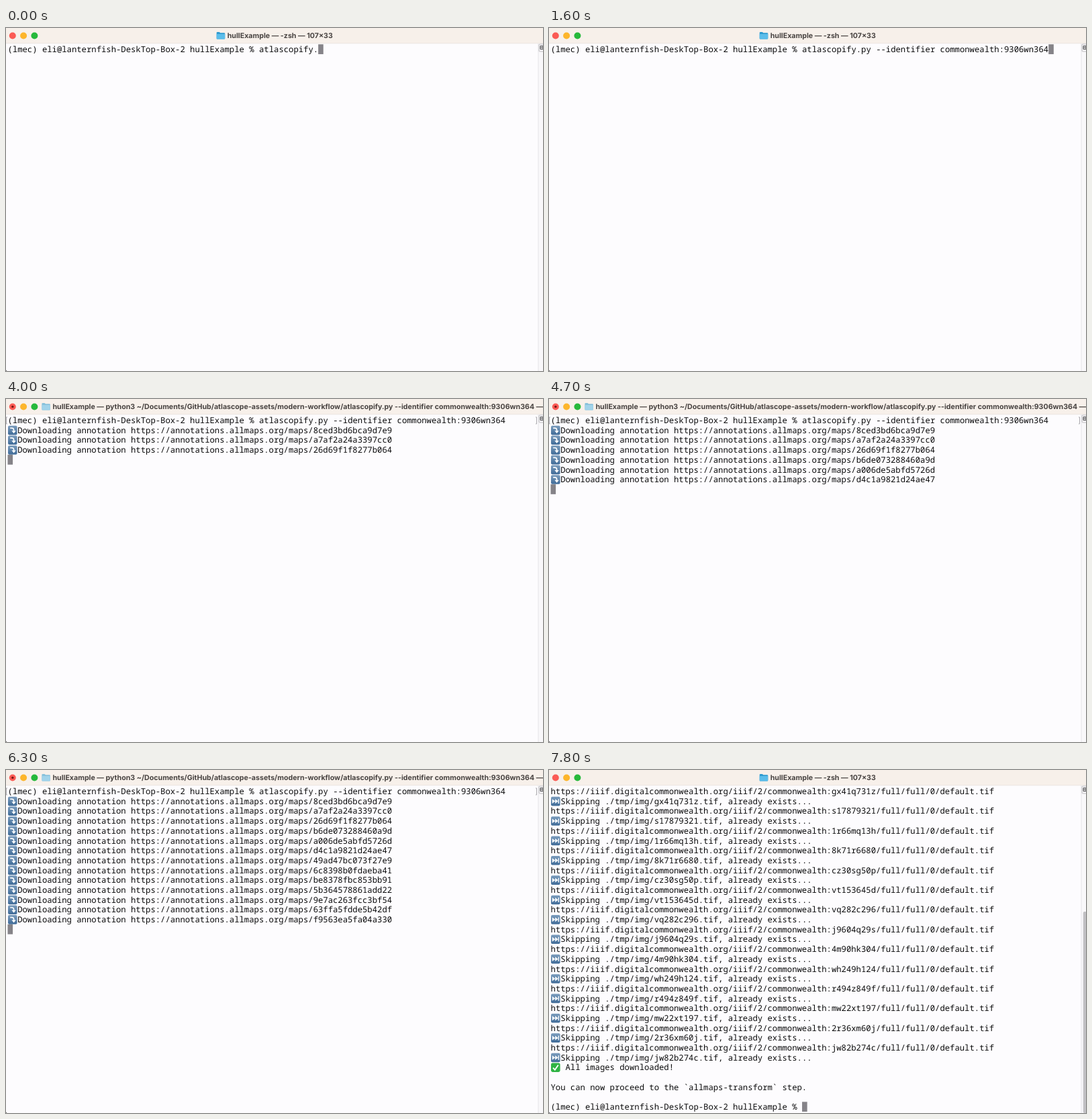
Write an HTML page that moves like this. It is 800 by 511 pixels and loops after 7.9 s.

```html
<!DOCTYPE html>
<html lang="en">
<head>
<meta charset="utf-8">
<title>Terminal session</title>
<style>
  html, body { margin: 0; width: 100%; height: 100%; overflow: hidden; background: #fdfcfe; }
  svg { display: block; width: 800px; height: 511px; }
  text { white-space: pre; text-rendering: geometricPrecision; }
  .mono { font: 500 12.24px "Noto Sans Mono", "DejaVu Sans Mono", monospace; fill: #0b0b0c; }
  .title { font: 700 10.65px Inter, Roboto, sans-serif; fill: #484341; }
  .cursor { fill: #858388; }
</style>
</head>
<body>
<svg id="stage" viewBox="0 0 800 511">
  <defs>
    <linearGradient id="key" x1="0" y1="0" x2="0" y2="1">
      <stop offset="0" stop-color="#7c9dbd"/>
      <stop offset="1" stop-color="#3f6b98"/>
    </linearGradient>
    <g id="down">
      <rect width="13.6" height="13.6" rx="2" fill="url(#key)"/>
      <path d="M3.2 3.6H6Q8.6 3.6 8.6 6.4V8" fill="none" stroke="#fff" stroke-width="1.7"/>
      <path d="M5.4 7.4H11.8L8.6 11.4Z" fill="#fff"/>
    </g>
    <g id="skip">
      <rect width="13.6" height="13.6" rx="2" fill="url(#key)"/>
      <path d="M1.8 3.4L6.2 6.8L1.8 10.2ZM6.2 3.4L10.6 6.8L6.2 10.2ZM10.6 3.4H12V10.2H10.6Z" fill="#fff"/>
    </g>
    <g id="check">
      <rect width="13.6" height="13.6" rx="2.4" fill="#2fb343"/>
      <path d="M3 7.2L5.8 10.4L10.8 3" fill="none" stroke="#fff" stroke-width="1.9"/>
    </g>
    <g id="folder">
      <path d="M0 1.4Q0 .3 1.1 .3H4.2L5.5 1.7H11.4Q12.5 1.7 12.5 2.8V10Q12.5 11 11.4 11H1.1Q0 11 0 10Z" fill="#2f9bd0"/>
      <path d="M0 3.4H12.5V10Q12.5 11 11.4 11H1.1Q0 11 0 10Z" fill="#5bbdea"/>
    </g>
  </defs>
  <rect width="800" height="511" fill="#fdfcfe"/>
  <rect width="800" height="23" fill="#f7f0ea"/>
  <rect y="22.5" width="800" height=".8" fill="#e9e3df"/>
  <rect x="793" y="23" width="7" height="488" fill="#f9f8fa"/>
  <rect x="792.5" y="23" width="1" height="488" fill="#e5e4e7"/>
  <rect x="794" y="24" width="8" height="11" rx="1" fill="#f1f0f2" stroke="#b5b4b7" stroke-width=".8"/>
  <path d="M796 26.8H800V31.5H796ZM796 29H800" fill="none" stroke="#4b4a4d"/>
  <path d="M0 509.2V511H1.8Q.4 510.6 0 509.2Z" fill="#333"/>
  <circle cx="9.8" cy="11.5" r="5" fill="#fb5b55"/>
  <circle cx="26.1" cy="11.5" r="5" fill="#fdb52b"/>
  <circle cx="42.4" cy="11.5" r="5" fill="#27b93c"/>
</svg>
<script>
const LOOP = 7900, RUN = 1900, DONE = 7600;
const LEFT = 2.5, CELL = 7.344, TOP = 24.3, ROW = 14.69;
const PROMPT = "(lmec) eli@lanternfish-DeskTop-Box-2 hullExample % ";
const COMMAND = "atlascopify.py --identifier commonwealth:9306wn364";
const PASTE = 28;
const MAPS = `8ced3bd6bca9d7e9 a7af2a24a3397cc0 26d69f1f8277b064 b6de073288460a9d
  a006de5abfd5726d d4c1a9821d24ae47 49ad47bc073f27e9 6c8398b0fdaeba41 be8378fbc853bb91
  5b364578861add22 9e7ac263fcc3bf54 63ffa5fdde5b42df f9563ea5fa04a330 7655d88667eb3dfb
  1abe32d90639821e 6f3c4418b8f74edd bce1adfccef4358b`.split(/\s+/);
const MAP_TIMES = [3600, 3800, 4000, 4300, 4500, 4700, 4900, 5100, 5300, 5500,
  5800, 6000, 6300, 6500, 6800, 7000, 7200];
const IMAGES = `gx41q731z s17879321 1r66mq13h 8k71r6680 cz30sg50p vt153645d vq282c296
  j9604q29s 4m90hk304 wh249h124 r494z849f mw22xt197 2r36xm60j jw82b274c`.split(/\s+/);

const stage = document.getElementById("stage");
const timed = [];
const colX = c => LEFT + c * CELL;
const rowY = r => TOP + r * ROW;

function add(tag, attrs, text = "", parent = stage) {
  const el = document.createElementNS("http://www.w3.org/2000/svg", tag);
  for (const name in attrs) el.setAttribute(name, attrs[name]);
  el.textContent = text;
  return parent.appendChild(el);
}

// A group that is visible from one time up to another.
function span(from, to) {
  const el = add("g", {});
  timed.push({ el, from, to });
  return el;
}

const write = (parent, row, col, text) =>
  add("text", { class: "mono", x: colX(col), y: rowY(row) + 11.8 }, text, parent);
const icon = (parent, row, name) =>
  add("use", { href: "#" + name, x: 3, y: rowY(row) + 0.8 }, "", parent);

function titleBar(parent, iconX, text, opacity) {
  add("use", { href: "#folder", x: iconX, y: 5.6, opacity }, "", parent);
  add("text", { class: "title", x: iconX + 16, y: 15 }, text, parent);
}

const shell = "hullExample — -zsh — 107×33";
titleBar(span(0, RUN), 313.7, shell, 1);
titleBar(span(DONE, LOOP), 313.7, shell, 1);

const running = span(RUN, DONE);
titleBar(running, 53.4, "hullExample — python3 ~/Documents/GitHub/atlascope-assets/modern-workflow/" +
  "atlascopify.py --identifier commonwealth:9306wn364 —...", 0.55);
add("circle", { cx: 9.8, cy: 11.5, r: 1.8, fill: "#7a1713" }, "", running);
add("path", { d: "M2 27H.5V37H2M789 27H790.5V37H789", fill: "none", stroke: "#aaa8ad" }, "", running);

const cursor = add("rect", { class: "cursor", width: 7.6, height: 14.7 });

const session = span(0, DONE);
write(session, 0, 0, PROMPT);
const typed = write(session, 0, PROMPT.length, "");

// Pasted text stays inverted for a moment.
const pasted = span(1200, 1600);
const pasteCol = PROMPT.length + PASTE;
add("rect", { x: colX(pasteCol), y: TOP, width: (COMMAND.length - PASTE) * CELL, height: 14.7, fill: "#0b0b0c" }, "", pasted);
write(pasted, 0, pasteCol, COMMAND.slice(PASTE)).style.fill = "#fdfcfe";

MAPS.forEach((id, i) => {
  const line = span(MAP_TIMES[i], DONE);
  icon(line, i + 1, "down");
  write(line, i + 1, 2, "Downloading annotation https://annotations.allmaps.org/maps/" + id);
});

const result = span(DONE, LOOP);
IMAGES.forEach((id, i) => {
  write(result, 2 * i, 0, `https://iiif.digitalcommonwealth.org/iiif/2/commonwealth:${id}/full/full/0/default.tif`);
  icon(result, 2 * i + 1, "skip");
  write(result, 2 * i + 1, 2, `Skipping ./tmp/img/${id}.tif, already exists...`);
});
icon(result, 28, "check");
write(result, 28, 3, "All images downloaded!");
write(result, 30, 0, "You can now proceed to the `allmaps-transform` step.");
write(result, 32, 0, PROMPT);
add("rect", { x: 795.8, y: 211, width: 5, height: 300, rx: 2, fill: "#c1c0c3" }, "", result);

function typedCount(t) {
  if (t < 200) return 12;
  if (t < 1000) return 12 + Math.round(14 * (Math.floor(t / 100) - 1) / 8);
  return t < 1200 ? PASTE : COMMAND.length;
}

function cursorCell(t, count) {
  if (t >= DONE) return [PROMPT.length, 32];
  if (t >= RUN) return [0, 1 + MAP_TIMES.filter(m => m <= t).length];
  return [PROMPT.length + count, 0];
}

function draw(t) {
  for (const { el, from, to } of timed) el.style.display = t >= from && t < to ? "" : "none";
  const count = typedCount(t);
  const [col, row] = cursorCell(t, count);
  typed.textContent = COMMAND.slice(0, count);
  cursor.setAttribute("x", colX(col));
  cursor.setAttribute("y", rowY(row));
}

const start = performance.now();
function tick() {
  draw((performance.now() - start) % LOOP);
  requestAnimationFrame(tick);
}
tick();
</script>
</body>
</html>
```
